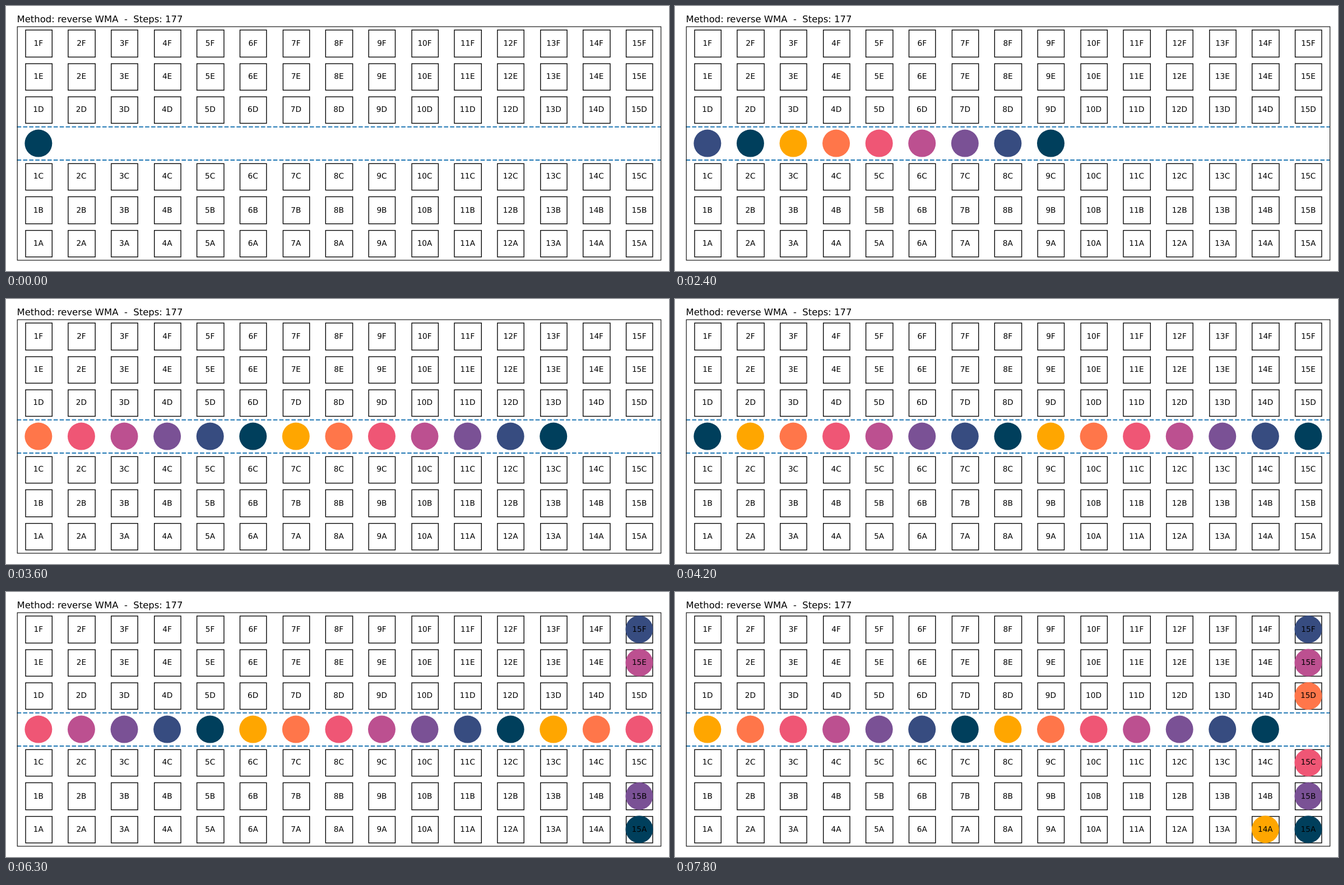
Write an HTML page that moves like this. It is 1183 by 473 pixels and loops after 8 s.

```html
<!DOCTYPE html>
<html lang="en">
<head>
<meta charset="utf-8">
<title>Boarding</title>
<style>
  html, body { margin: 0; width: 100%; height: 100%; overflow: hidden; background: #fff; }
  svg { display: block; width: 1183px; height: 473px; }
  text { font-family: "DejaVu Sans", sans-serif; font-size: 13.89px; text-rendering: geometricPrecision; }
  .title { font-size: 16.67px; white-space: pre; }
  .seat { fill: none; stroke: #000; stroke-width: 1.39; }
  .frame { fill: none; stroke: #000; stroke-width: 1.11; }
  .aisle { stroke: #1f77b4; stroke-width: 2.08; stroke-dasharray: 7.71 3.33; }
</style>
</head>
<body>
<svg id="stage" viewBox="0 0 1200 480" preserveAspectRatio="none"></svg>
<script>
const LOOP = 8000, TICK = 300, COLS = 15;
const ROWS = "FED-CBA"; // the dash is the aisle
const AISLE = ROWS.indexOf("-");
const LEFT = 19.86, RIGHT = 1185, TOP = 37.3, BOTTOM = 460.14;
const PITCH_X = (RIGHT - LEFT) / COLS, PITCH_Y = (BOTTOM - TOP) / ROWS.length;
const HALF = 0.4 * PITCH_Y, RADIUS = HALF + 0.69;
const COLORS = ["#003f5c", "#374c80", "#7a5195", "#bc5090", "#ef5675", "#ff764a", "#ffa600"];

// Passengers sit down in boarding order: [time, column, row]
const SEATED = [
  [5100, 14, "A"], [5700, 14, "F"], [6000, 14, "B"], [6300, 14, "E"],
  [6600, 14, "C"], [7200, 14, "D"], [7800, 13, "A"]
];
// Times at which the full queue moves up one column
const ADVANCES = [5100, 5700, 6000, 6300, 6600, 7800];

const stage = document.getElementById("stage");
const colX = c => LEFT + (c + 0.5) * PITCH_X;
const rowY = r => TOP + (r + 0.5) * PITCH_Y;
const snap = v => Math.round(v) + 0.5;

function add(parent, tag, attrs, content) {
  const el = document.createElementNS("http://www.w3.org/2000/svg", tag);
  for (const key in attrs) el.setAttribute(key, attrs[key]);
  if (content) el.textContent = content;
  return parent.appendChild(el);
}

function addBox(cls, x1, y1, x2, y2) {
  const x = snap(x1), y = snap(y1);
  add(stage, "rect", { class: cls, x, y, width: snap(x2) - x, height: snap(y2) - y });
}

function eachSeat(draw) {
  [...ROWS].forEach((name, r) => {
    if (r === AISLE) return;
    for (let c = 0; c < COLS; c++) draw(colX(c), rowY(r), `${c + 1}${name}`);
  });
}

eachSeat((x, y) => addBox("seat", x - HALF, y - HALF, x + HALF, y + HALF));
const people = add(stage, "g", {});
for (const edge of [AISLE, AISLE + 1]) {
  const y = Math.round(TOP + edge * PITCH_Y);
  add(stage, "line", { class: "aisle", x1: LEFT, x2: RIGHT, y1: y, y2: y });
}
addBox("frame", LEFT, TOP, RIGHT, BOTTOM);
eachSeat((x, y, label) =>
  add(stage, "text", { x, y: Math.round(y + 4), "text-anchor": "middle" }, label));
add(stage, "text", { class: "title", x: LEFT, y: 29 }, "Method: reverse WMA  -  Steps: 177");

const count = COLS + ADVANCES.length;
const dots = Array.from({ length: count }, (_, i) =>
  add(people, "circle", { r: RADIUS, fill: COLORS[i % COLORS.length] }));

function show(t) {
  const step = Math.min(Math.floor(t / TICK), COLS - 1) + ADVANCES.filter(a => a <= t).length;
  dots.forEach((dot, i) => {
    const seat = SEATED[i];
    const sits = seat && t >= seat[0];
    const col = sits ? seat[1] : step - i;
    const row = sits ? ROWS.indexOf(seat[2]) : AISLE;
    dot.setAttribute("cx", colX(col));
    dot.setAttribute("cy", rowY(row));
    dot.style.display = col < 0 ? "none" : "";
  });
}

const start = performance.now();
function tick() {
  show((performance.now() - start) % LOOP);
  requestAnimationFrame(tick);
}
tick();
</script>
</body>
</html>
```
